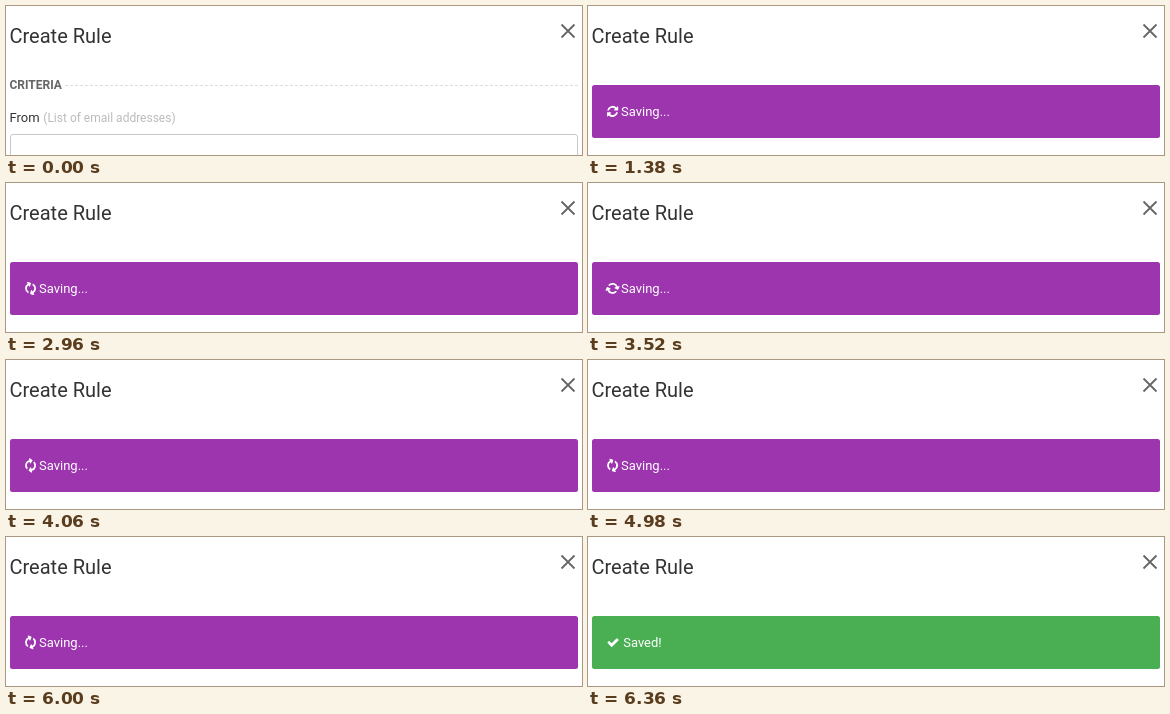
Animation of 576x149 px, one loop 6940 ms. Source, as an HTML page:

```html
<!DOCTYPE html>
<html lang="en">
<head>
<meta charset="utf-8">
<title>Create Rule</title>
<style>
  html, body { margin: 0; width: 100%; height: 100%; overflow: hidden; background: #fff; }
  svg { display: block; font: 13px Roboto, sans-serif; fill: #333; }
  .title { font-size: 20px; }
  .heading { font-size: 12px; font-weight: 700; fill: #666; }
  .hint { font-size: 12px; fill: #bbb; }
  .line { fill: none; stroke: #ddd; }
  .field { fill: #fff; stroke: #c8c8c8; }
  .close { stroke: #666; stroke-width: 1.8; }
  .banner { fill: #fff; }
  [hidden] { display: none; }
</style>
</head>
<body>
<svg width="576" height="149" viewBox="0 0 576 149">
  <defs>
    <path id="arrow" d="M1639 1056A768 768 0 0 1 366 1451L237 1580Q128 1620 128 1516V1088Q128 1024 192 1024H640Q730 1050 685 1133L548 1270A512 512 0 0 0 1333 1160L1394 1024H1607Q1639 1024 1639 1056z"/>
  </defs>

  <text class="title" x="3.5" y="37">Create Rule</text>
  <path class="close" d="M555.5 18.5l13 13m0-13l-13 13"/>

  <g id="form">
    <text class="heading" x="3.5" y="83">CRITERIA</text>
    <path class="line" stroke-dasharray="3 2" d="M59 79.5H572"/>
    <text x="3.5" y="116">From</text>
    <text class="hint" x="37.3" y="116">(List of email addresses)</text>
    <rect class="field" x="4.5" y="128.5" width="567" height="40" rx="2.5"/>
  </g>

  <g id="saving" class="banner" hidden>
    <rect x="4" y="79" width="568" height="53" rx="2.5" fill="#9c35ae"/>
    <g transform="translate(24.57 105.4) scale(.007254)">
      <g id="spinner">
        <use href="#arrow" x="-896" y="-896"/>
        <use href="#arrow" x="-896" y="-896" transform="rotate(180)"/>
      </g>
    </g>
    <text x="33" y="110">Saving...</text>
  </g>

  <g id="saved" class="banner" hidden>
    <rect x="4" y="79" width="568" height="53" rx="2.5" fill="#4aae52"/>
    <path transform="translate(18.5 98.9) scale(.007254)" d="M1671 566q0 40-28 68l-724 724-136 136q-28 28-68 28t-68-28l-136-136-362-362q-28-28-28-68t28-68l136-136q28-28 68-28t68 28l294 295 656-657q28-28 68-28t68 28l136 136q28 28 28 68z"/>
    <text x="35.2" y="110">Saved!</text>
  </g>
</svg>
<script>
  const LOOP = 6940, SAVE_AT = 1380, DONE_AT = 6360, TURN = 2000;
  const byId = id => document.getElementById(id);
  const show = (id, on) => byId(id).toggleAttribute('hidden', !on);
  const start = performance.now();

  function draw(now) {
    const t = Math.max(0, now - start) % LOOP;
    show('form', t < SAVE_AT);
    show('saving', t >= SAVE_AT && t < DONE_AT);
    show('saved', t >= DONE_AT);
    byId('spinner').setAttribute('transform', `rotate(${(t - SAVE_AT) / TURN * 360})`);
    requestAnimationFrame(draw);
  }
  draw(start);
</script>
</body>
</html>
```
